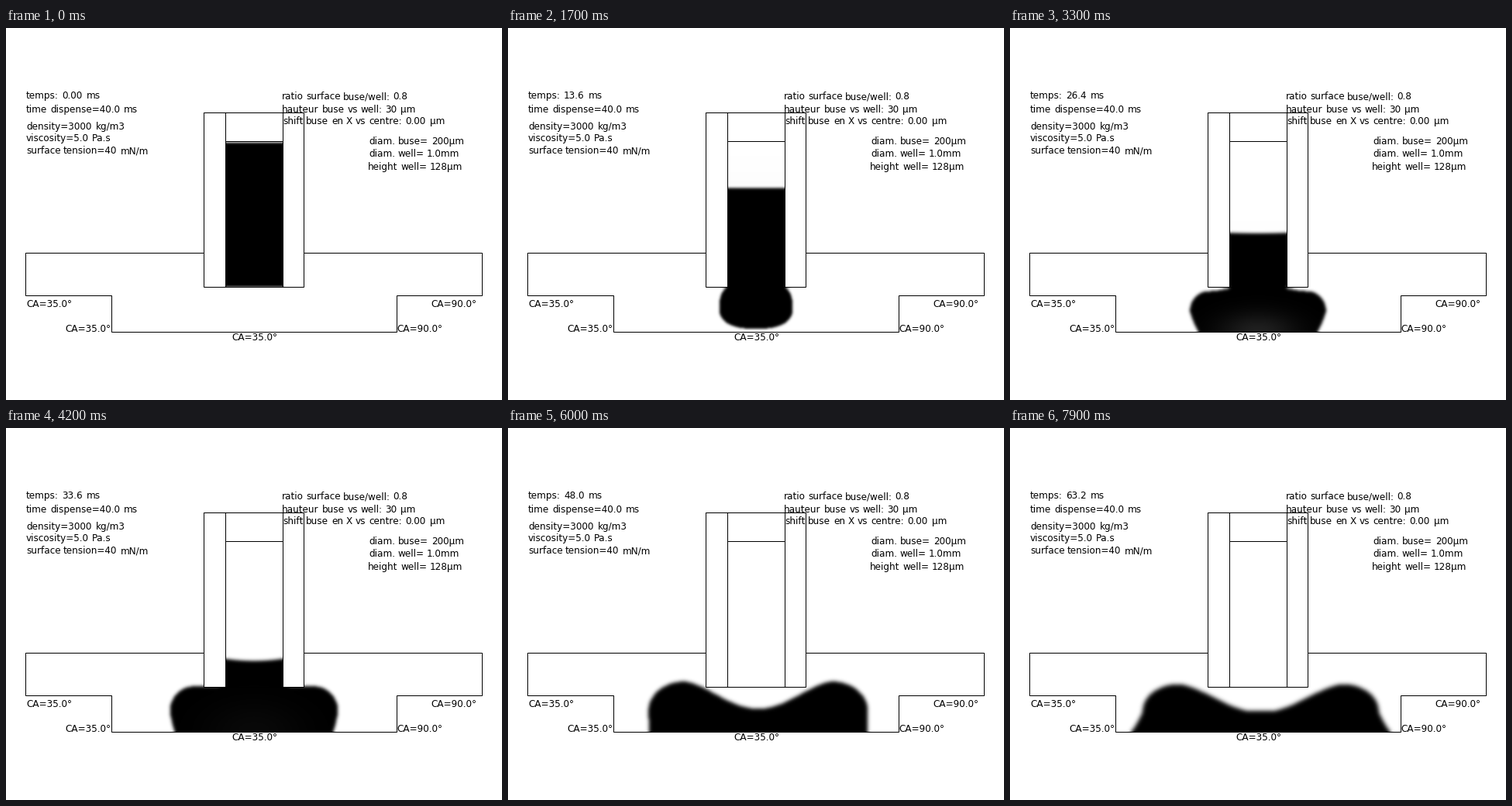
Animation of 640x480 px, one loop 8 s. Source, as a matplotlib script:

```python
import numpy as np
import matplotlib.pyplot as plt
from matplotlib.animation import FuncAnimation
from matplotlib.textpath import TextPath

plt.rcParams.update({
    "font.family": "DejaVu Sans",
    "font.size": 8.64,           # 12 px
    "text.hinting": "force_autohint",
    "text.kerning_factor": 6,
    "toolbar": "None",
})

W, H, DPI = 640, 480, 100
FRAMES, STEP = 80, 100
CONTACT, EMPTY = 2.0, 5.2        # s: drop meets the floor, nozzle runs empty
FLOOR, TIP, FILL, BORE = 392, 334, 146, 37
X0, X1, Y0, Y1 = 140, 510, 140, 404

xs = np.arange(X0, X1) + 0.5
ys = np.arange(Y0, Y1) + 0.5
X, Y = np.meshgrid(xs, ys)
DX = np.abs(X - 320)
IN_WALL = (Y < TIP) & (DX > BORE) & (DX < 64.5)
IN_BORE = (Y < TIP) & (DX < BORE)


def smooth(u):
    u = np.clip(u, 0, 1)
    return u * u * (3 - 2 * u)


def blur_matrix(v, s):
    k = np.exp(-((v[:, None] - v[None, :]) / s) ** 2 / 2)
    return k / k.sum(axis=1, keepdims=True)


def surface(t):
    """Height of the liquid in the middle, and how far it sags there."""
    if t < EMPTY:
        y = 148 + 34 * t + 0.13 * t**3
    else:
        y = 367 - 23.5 * np.exp((EMPTY - t) / 0.5)
    return y, 14.5 * np.exp(-abs(t - EMPTY) / 0.6)


def hanging_drop(t):
    """Superellipse that swells below the nozzle."""
    h = 0.25 + 31.5 * (1 - np.exp(-t / 0.85))
    cy = TIP + 0.97 * h
    w = 35 + 4.3 * t * t
    ry = np.where(Y < cy, 1.35 * h, h)
    return (DX / w) ** 2.5 + (np.abs(Y - cy) / ry) ** 2.5 < 1, cy


def spreading_drop(t, middle):
    """Two round lobes moving apart, with a hollow between them."""
    s = t - CONTACT
    settle = 15 * smooth((s - 4) / 1.9)
    radius = 52 + 184 * (1 - np.exp(-s / 6)) - settle
    inset = 15 * np.exp(-(s / 2.3) ** 2) - settle     # foot against belly
    belly = 365
    top = min(340, 327 + 1.4 * (s - 4.3) ** 2)
    lobe = min(14 + 8 * s, 46)
    crest = radius - lobe
    d = np.abs(X - 320 - 3.5 * smooth((t - 4.2) / 2.5))

    u = np.clip((Y - belly) / (FLOOR - belly), 0, 1)
    below = (Y >= belly) & (d < radius - inset * u**1.3)
    outer = (Y < belly) & (d >= crest) & (
        ((d - crest) / lobe) ** 2 + ((belly - Y) / (belly - top)) ** 2 < 1)
    wave = (0.5 + 0.5 * np.cos(np.pi * np.minimum(d / crest, 1))) ** 0.8
    inner = (Y < belly) & (d < crest) & (Y > top + (middle - top) * wave)
    return below | outer | inner


def liquid(t):
    """Grey picture of the liquid, 1 for white."""
    level, sag = surface(t)
    if t < CONTACT:
        drop, base = hanging_drop(t)
    else:
        drop, base = spreading_drop(t, max(level, 332)), 350
    top = level - sag * np.minimum(DX / BORE, 1) ** 2
    column = np.clip(Y - top + 0.5, 0, 1)
    column[(Y > base) | (DX > np.where(Y < TIP, BORE + 8, BORE))] = 0
    s = 1.4 + 0.18 * t
    dark = np.maximum(drop, column)
    dark = blur_matrix(ys, s) @ dark @ blur_matrix(xs, s).T

    # thin film left behind in the bore
    film = 0.025 * max(0, 1 - t / 4.5) * np.exp(np.minimum(Y - level, 0) / 30)
    dark = np.where(IN_BORE, np.maximum(dark, film), dark)

    # air caught under the drop fades away
    if t >= CONTACT:
        age = t - CONTACT
        rx, ry = 28 + 17 * age, 3 + 17 * age
        spot = np.exp(-((X - 320) / rx) ** 2 - ((FLOOR - Y) / ry) ** 2)
        dark *= 1 - 0.8 * np.exp(-age / 0.7) * spot

    dark[IN_WALL | (Y < FILL)] = 0
    dark[Y > TIP] *= min(1, 10 * t)
    return 1 - dark[:FLOOR - Y0]


fig = plt.figure(figsize=(W / DPI, H / DPI), dpi=DPI, facecolor="white")
ax = fig.add_axes([0, 0, 1, 1])
ax.axis("off")
picture = ax.imshow(liquid(0), cmap="gray", vmin=0, vmax=1,
                    extent=(X0, X1, FLOOR, Y0), interpolation="nearest",
                    aspect="auto", zorder=1)
ax.set_xlim(0, W)
ax.set_ylim(H, 0)


def line(*points):
    ax.plot(*np.array(points).T, color="black", lw=0.72, snap=True,
            solid_joinstyle="miter", solid_capstyle="projecting", zorder=2)


def ink(s):
    return TextPath((0, 0), s, size=12).get_extents().width


def advance(c):
    """Width of a character in whole pixels."""
    return round(ink(f"|{c}|") - ink("||"))


def label(x, y, text):
    """Set the words of a text on whole-pixel advances."""
    words = []
    for word in text.split(" "):
        words.append(ax.text(x, y, word, va="baseline", ha="left", zorder=3))
        x += sum(advance(c) for c in word + " ")
    return words


line((255, 290), (25, 290), (25, 345), (136, 345), (136, 392),
     (504, 392), (504, 345), (614, 345), (614, 290), (384, 290))
line((255, 109), (384, 109), (384, 334), (255, 334), (255, 109))
line((283, 109), (283, 334))
line((357, 109), (357, 334))
line((283, 146), (357, 146))

clock = label(26, 91, "temps: 0.00 ms")[1]
for x, y, text in [
    (26, 109, "time dispense=40.0 ms"),
    (26, 131, "density=3000 kg/m3"),
    (26, 146, "viscosity=5.0 Pa.s"),
    (26, 162, "surface tension=40 mN/m"),
    (356, 92, "ratio surface buse/well: 0.8"),
    (356, 109, "hauteur buse vs well: 30 µm"),
    (357, 124, "shift buse en X vs centre: 0.00 µm"),
    (468, 150, "diam. buse= 200µm"),
    (468, 166, "diam. well= 1.0mm"),
    (467, 183, "height well= 128µm"),
    (26, 360, "CA=35.0°"),
    (76, 392, "CA=35.0°"),
    (291, 403, "CA=35.0°"),
    (504, 392, "CA=90.0°"),
    (548, 360, "CA=90.0°"),
]:
    label(x, y, text)


def update(i):
    ms = 0.8 * i
    clock.set_text(f"{ms:.{2 if ms < 9.99 else 1}f}")
    picture.set_data(liquid(i * STEP / 1000))
    return picture, clock


anim = FuncAnimation(fig, update, frames=FRAMES, interval=STEP,
                     repeat=True, repeat_delay=0, blit=False)
plt.show()
```
